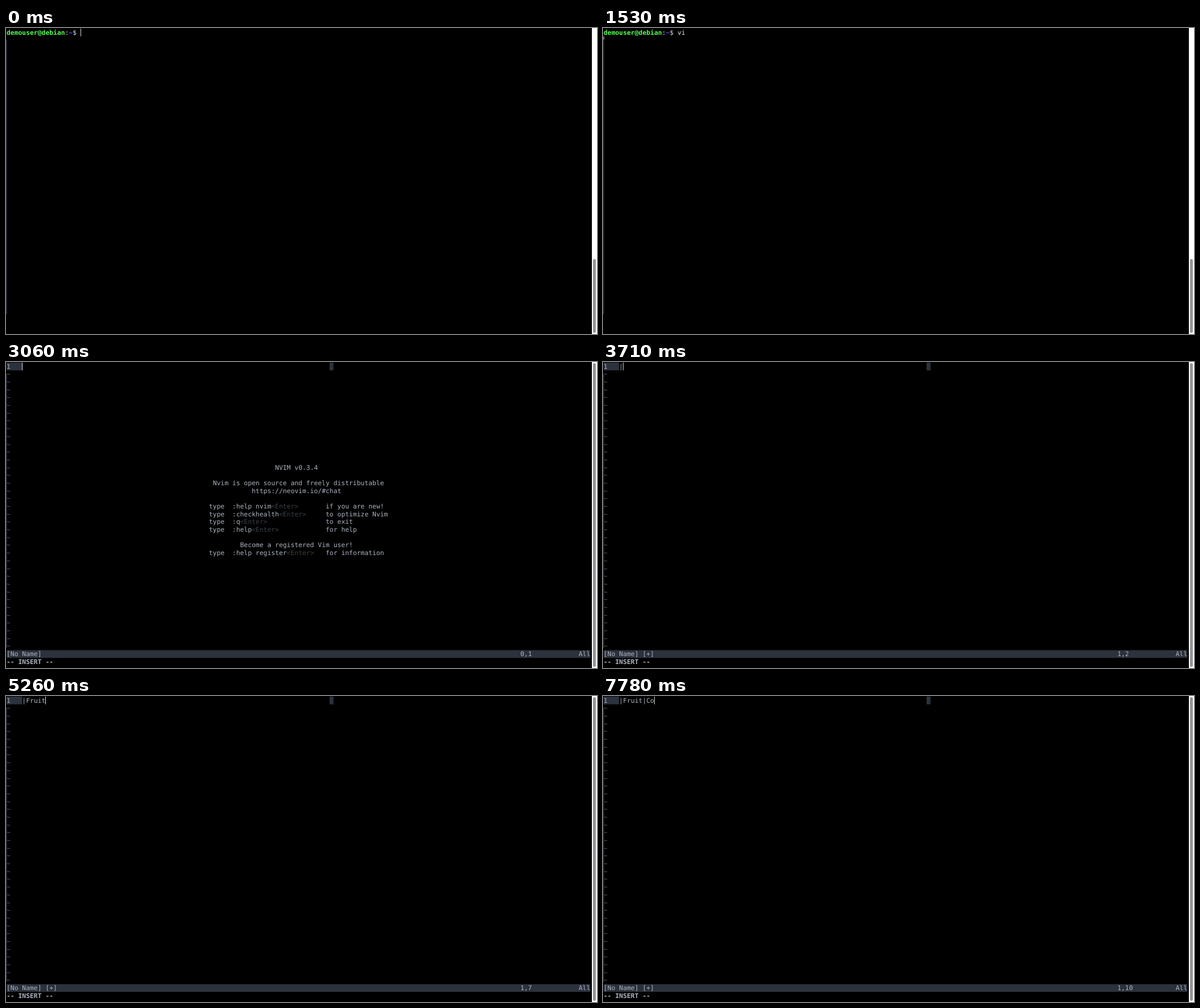
An HTML page for the animation above (8 s loop, 1039 by 539 pixels).

```html
<!DOCTYPE html>
<html lang="en">
<head>
<meta charset="utf-8">
<title>Terminal session</title>
<style>
  html, body { margin: 0; width: 100%; height: 100%; overflow: hidden; background: #000; }
  svg { display: block; width: 1039px; height: 539px; }
  text {
    font-family: "DejaVu Sans Mono", monospace;
    font-size: 11.365px;
    white-space: pre;
    text-rendering: geometricPrecision;
  }
</style>
</head>
<body>
<svg id="stage" viewBox="0 0 1039 539"></svg>
<script>
const LOOP = 8000;
const CELL = 6.842, ROW = 13.69, MARGIN = 1, BASELINE = 10.6;
const FG = '#abb2bf', BAR = '#2c323c', DIM = '#3b4048', TILDE = '#5a606a';
const SHELL = '#e0e0e0', CURSOR = '#d8d8d8';

const SHELL_KEYS = [500, 620];
const ENTER = 1530, EDITOR = 1600, INSERT = 3060;
const TYPED = '|Fruit|Co';
const TYPED_KEYS = [3710, 4360, 4590, 4960, 5060, 5260, 6530, 7390, 7780];

const stage = document.getElementById('stage');
const colX = col => MARGIN + col * CELL;
const rowY = row => MARGIN + row * ROW;

function add(parent, tag, attrs) {
  const node = document.createElementNS('http://www.w3.org/2000/svg', tag);
  for (const key in attrs) node.setAttribute(key, attrs[key]);
  return parent.appendChild(node);
}
const group = () => add(stage, 'g', {});
const rect = (parent, x, y, width, height, fill, rx = 0) =>
  add(parent, 'rect', { x, y, width, height, fill, rx });
const cells = (parent, col, row, count, fill) =>
  rect(parent, colX(col), rowY(row), count * CELL, ROW, fill);

function write(parent, col, row, content, fill = FG, weight = 400) {
  const node = add(parent, 'text', { x: colX(col), y: rowY(row) + BASELINE, fill, 'font-weight': weight });
  node.textContent = content;
  return node;
}
const show = (node, visible) => node.setAttribute('display', visible ? 'inline' : 'none');

rect(stage, 0, 0, 1039, 539, '#000');

// Shell prompt
const shell = group();
write(shell, 0, 0, 'demouser@debian', '#55ff55', 700);
write(shell, 15, 0, ':', SHELL);
write(shell, 16, 0, '~', '#5555ff', 700);
write(shell, 17, 0, '$', SHELL);
const command = write(shell, 19, 0, '', SHELL);

// Editor window
const editor = group();
cells(editor, 0, 0, 4, BAR);
cells(editor, 83, 0, 1, BAR);
write(editor, 0, 0, '1');
for (let row = 1; row <= 36; row++) write(editor, 0, row, '~', TILDE);
cells(editor, 0, 37, 150, BAR);
const fileName = write(editor, 0, 37, '');
const ruler = write(editor, 132, 37, '');
write(editor, 147, 37, 'All');
const mode = write(editor, 0, 38, '-- INSERT --', FG, 700);
const buffer = write(editor, 4, 0, '');

// Welcome message
const intro = group();
write(intro, 69, 13, 'NVIM v0.3.4');
write(intro, 53, 15, 'Nvim is open source and freely distributable');
write(intro, 63, 16, 'https://neovim.io/#chat');
write(intro, 60, 23, 'Become a registered Vim user!');
[
  [18, ':help nvim', 'if you are new!'],
  [19, ':checkhealth', 'to optimize Nvim'],
  [20, ':q', 'to exit'],
  [21, ':help', 'for help'],
  [24, ':help register', 'for information']
].forEach(([row, keys, purpose]) => {
  write(intro, 52, row, 'type');
  write(intro, 58, row, keys);
  write(intro, 58 + keys.length, row, '<Enter>', DIM);
  write(intro, 82, row, purpose);
});

const cursor = rect(stage, 0, 0, 1, ROW, CURSOR);

// Window edge and scrollbar
rect(stage, 0, 20.5, 2, 483.5, '#25262f');
rect(stage, 1030, 0, 9, 539, '#fff');
const thumb = rect(stage, 1032, 0, 5, 0, '#939397', 2.5);

function placeCursor(col, row, block) {
  cursor.setAttribute('x', block ? colX(col) : Math.round(colX(col) - 0.2));
  cursor.setAttribute('y', rowY(row));
  cursor.setAttribute('width', block ? CELL : 1);
  cursor.setAttribute('fill', block ? '#bcc2cc' : CURSOR);
}

function render(time) {
  const pressed = keys => keys.filter(at => time >= at).length;
  const inEditor = time >= EDITOR, inserting = time >= INSERT;
  const commandLength = pressed(SHELL_KEYS), count = pressed(TYPED_KEYS);

  show(shell, !inEditor);
  show(editor, inEditor);
  show(intro, inEditor && count === 0);
  show(mode, inserting);

  command.textContent = 'vi'.slice(0, commandLength);
  buffer.textContent = TYPED.slice(0, count);
  fileName.textContent = count ? '[No Name] [+]' : '[No Name]';
  ruler.textContent = !inserting ? '0,0-1' : count ? `1,${count + 1}` : '0,1';

  if (inEditor) placeCursor(4 + count, 0, !inserting);
  else if (time >= ENTER) placeCursor(0, 1, false);
  else placeCursor(19 + commandLength, 0, false);

  const top = inEditor ? 2 : 407;
  thumb.setAttribute('y', top);
  thumb.setAttribute('height', 537 - top);
}

const start = performance.now();
function tick() {
  render((performance.now() - start) % LOOP);
  requestAnimationFrame(tick);
}
tick();
</script>
</body>
</html>
```
